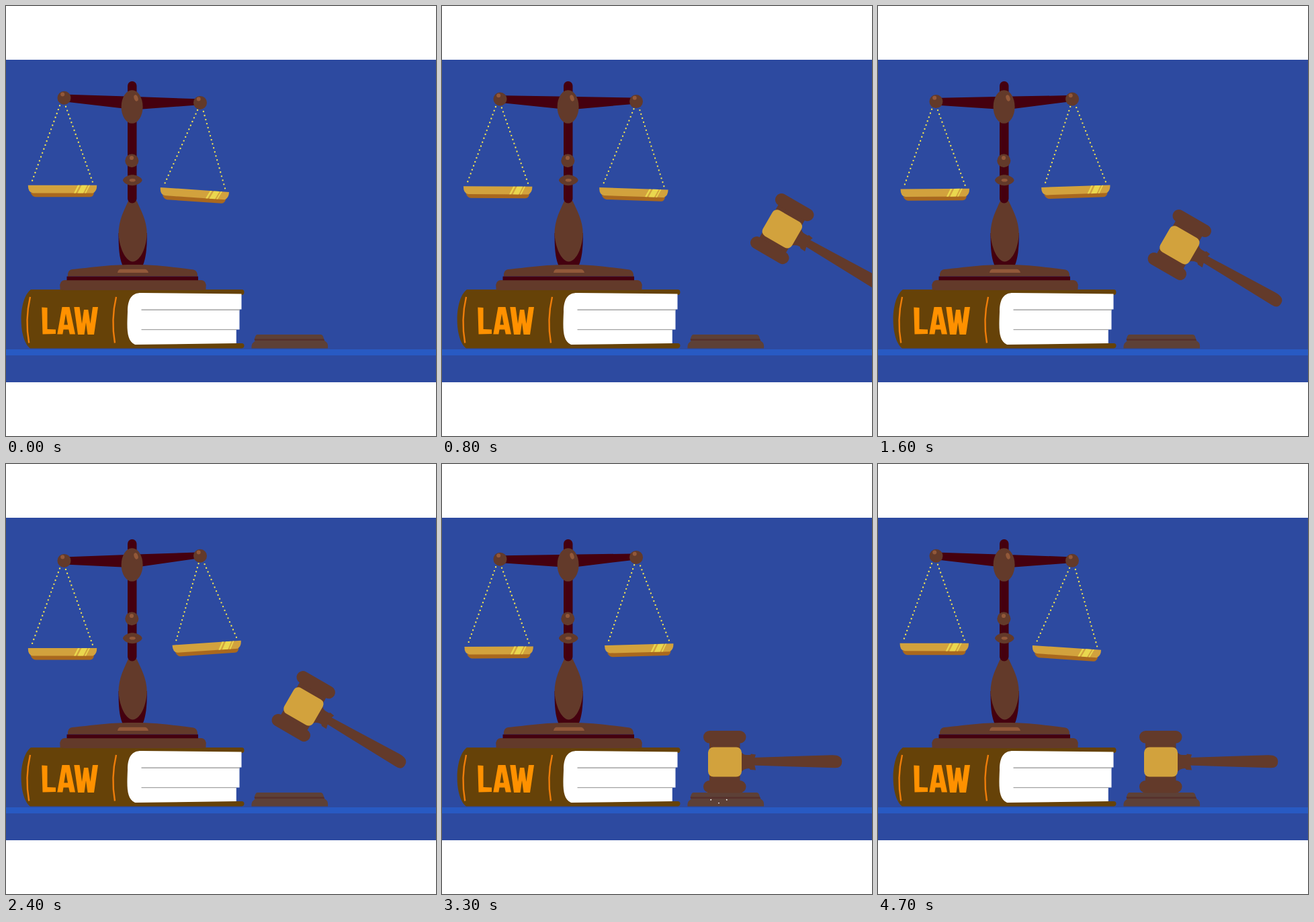
An HTML page that plays this animation: 640x640 px, repeating every 4800 ms.

```html
<!DOCTYPE html>
<html lang="en">
<head>
<meta charset="utf-8">
<title>Scales and gavel</title>
<style>
  html, body { margin: 0; width: 100%; height: 100%; overflow: hidden; background: #fff; }
  svg { display: block; width: 100%; height: 100%; }
  .wood { fill: #633a2a; }
  .dark { fill: #45000f; }
  .shine { fill: #925839; }
  .gold { fill: #d2a23d; }
  .string { stroke: #efe052; stroke-width: 2.4; stroke-linecap: round; stroke-dasharray: 0 6.25; }
</style>
</head>
<body>
<svg viewBox="0 0 640 640">
  <defs>
    <g id="pan">
      <path class="string" d="M-4 -118.5L-45.8 -4.5M5 -117L45 -4.5"/>
      <path fill="#a9681e" d="M-47.5 11H47Q46 17.5 41 17.5H-40Q-45 17 -47.5 11Z"/>
      <path class="gold" d="M-51.2 0H51.2Q51.5 8.5 45.5 11.7H-44Q-51.5 10.5 -51.2 0Z"/>
      <path fill="#ead74e" d="M23 0h2.8l-6 11.7h-2.8zM28.5 0h8.5l-6 11.7h-8.5zM39 0h2l-6 11.7h-2z"/>
    </g>
    <g id="knob">
      <circle class="wood" r="10"/>
      <circle class="shine" cx="-2.3" cy="-5.3" r="3"/>
    </g>
  </defs>

  <path fill="#2d4aa0" d="M0 80H640V560H0Z"/>
  <path fill="#285ac3" d="M0 511H640V520H0Z"/>

  <g id="block">
    <path fill="#5d4037" d="M374 489H468Q471 489 472 492L474 498L477.5 501Q479.5 503 479 509.5H365.5Q365 503 368 501L371 498Q369 496 371 492Q372 489 374 489Z"/>
    <path fill="#56302b" d="M369.5 495.6H473L474 498H370Z"/>
  </g>

  <g id="book">
    <path fill="#664208" d="M37 422H351Q354.5 422 354.5 426T351 430H340V502H351Q354.5 502 354.5 505.5T351 509.5H36C18 496 18 436 37 422Z"/>
    <path fill="#fff" d="M201 427L350.5 428.5V451.5H347.5V481.5H342.8V502L192 504C179 498 180 480 181 455C181 435 188 427 201 427Z"/>
    <path fill="none" stroke="#a3a3a3" stroke-width="1.4" d="M201.5 452.2H348M201.5 481.6H343"/>
    <path fill="none" stroke="#ee7d0a" stroke-width="2.4" d="M36 433Q28 467 34.2 501.5M164 433Q156 467 162 501.5"/>
    <path role="img" aria-label="LAW" fill="#ff9100" fill-rule="evenodd"
      d="M53.3 448.5L61.5 449V481L74 481.5V488L54.5 488.5Z
         M76.3 488.5L83.5 448H94.5L103 488.5H94.8L93.3 481.5H85.5L84.3 488.5ZM86.3 474.5H92L89 458Z
         M101.3 448H109.5L113 473L116 452H122.3L125.5 473L129 448H137L131 489H121.5L119 471L116.5 489H107Z"/>
  </g>

  <g id="stand">
    <rect class="wood" x="80.5" y="408" width="217" height="15" rx="7"/>
    <path class="wood" d="M80.5 414H297.5V422.5H80.5Z"/>
    <path class="dark" d="M167.5 338C167.5 364 169 375 173.5 386.5H203.5C208 376 210 362 209.8 338Z"/>
    <path class="wood" d="M92 402.5Q91.5 393 98 392C130 389 150 385 188 385S250 389 279 392.5Q285.5 394 285 402.5Z"/>
    <path class="dark" d="M90.5 402.5H286V408.3H90.5Z"/>
    <path class="shine" d="M170 391.8H207Q210.5 392 212 397H166Q167 392 170 391.8Z"/>
    <path class="wood" d="M182 290C176 304 167.5 318 167.5 340C169.5 365 180 380 188.5 380.5C198 380 208 365 209.8 340C209.8 318 200 303 194.5 290Z"/>
    <rect class="dark" x="181" y="112" width="13.5" height="181.5" rx="6.7"/>
    <circle class="wood" cx="187.3" cy="230.2" r="10"/>
    <circle class="shine" cx="187" cy="226" r="3.1"/>
    <path class="wood" d="M188 251.3C195 251.3 202.5 256 202.5 259.3S195 267.3 188 267.3S174 262.5 174 259.3S181 251.3 188 251.3Z"/>
    <ellipse class="shine" cx="188.2" cy="259.3" rx="4.5" ry="2.3"/>
  </g>

  <path id="beam" class="dark" d="M93 135L187 134.8L284 134.8V144.2L203 152.9H173L93 146.3Z"/>
  <use id="leftPan" href="#pan"/>
  <use id="rightPan" href="#pan"/>
  <use id="leftKnob" href="#knob"/>
  <use id="rightKnob" href="#knob"/>
  <ellipse class="wood" cx="187.6" cy="150" rx="16" ry="24.8"/>
  <ellipse class="shine" cx="193.5" cy="137" rx="2.9" ry="4.8" transform="rotate(-20 193.5 137)"/>

  <path id="spark" fill="none" stroke="#fff" stroke-width="1.6" stroke-linecap="round"/>

  <g id="gavel" class="wood">
    <path d="M462 437L580 433.3Q595.3 433 595.3 443T584 452.2L462 448.5Z"/>
    <path d="M445 428Q448 433 453 433H459L460 431.5L467 432.5L465.5 437V449L467 455.5L459 455L457 453Q449 453 445 459Z"/>
    <path d="M398 410H443.5V476H398Z"/>
    <rect x="389" y="397" width="63.5" height="18.7" rx="9.3"/>
    <rect x="389" y="471" width="63.5" height="18.5" rx="9.2"/>
    <rect class="gold" x="396" y="421.5" width="50" height="44" rx="8"/>
  </g>
</svg>
<script>
const LOOP = 4800, STEP = 100;
const PIVOT = { x: 187.75, y: 140.3, arm: 101.3 };
const GRIP = { x: 586, y: 443 };
const part = id => document.getElementById(id);
const pose = (id, transform) => part(id).setAttribute('transform', transform);
const clamp = v => Math.min(1, Math.max(0, v));
const DEG = Math.PI / 180;

function drawScales(t) {
  const swing = Math.cos(2 * Math.PI * t / LOOP);
  const tilt = 2.03 * swing;
  const dx = PIVOT.arm * Math.cos(tilt * DEG), dy = PIVOT.arm * Math.sin(tilt * DEG);
  const left = `translate(${PIVOT.x - dx} ${PIVOT.y - dy})`;
  const right = `translate(${PIVOT.x + dx} ${PIVOT.y + dy})`;
  const leftLag = 0.85 * swing * Math.sqrt(1 - swing * swing);
  pose('beam', `rotate(${tilt} ${PIVOT.x} ${PIVOT.y})`);
  pose('leftKnob', left);
  pose('rightKnob', right);
  pose('leftPan', `${left} rotate(${leftLag}) translate(-2.5 130)`);
  pose('rightPan', `${right} rotate(${3.9 * swing}) translate(0.8 129.8)`);
}

// Glides in from the right, then swings down about the end of its handle.
function drawGavel(t) {
  const left = 1 - clamp(t / 2400);
  const fall = Math.sin(Math.PI / 2 * clamp((t - 2400) / 640) ** 0.8) ** 2;
  const x = 252 * left ** 3.4, y = -80 * left ** 2.5;
  pose('gavel', `translate(${x} ${y}) rotate(${30 * (1 - fall)} ${GRIP.x} ${GRIP.y})`);
}

function drawSpark(t) {
  const p = (t - 2720) / 640;
  let d = '';
  if (p > 0 && p < 1) {
    const tip = 20 * (1 - (1 - p) ** 2) - 3, tail = 20 * p * p;
    for (let i = 0; i < 8 && tip > tail; i++) {
      const c = Math.cos(i * Math.PI / 4), s = Math.sin(i * Math.PI / 4);
      d += `M${412 + tail * c} ${488 + tail * s}L${412 + tip * c} ${488 + tip * s}`;
    }
  }
  part('spark').setAttribute('d', d);
}

function draw(ms) {
  const t = Math.floor(ms % LOOP / STEP) * STEP;
  drawScales(t);
  drawGavel(t);
  drawSpark(t);
}

const start = performance.now();
function tick() {
  draw(performance.now() - start);
  requestAnimationFrame(tick);
}
tick();
</script>
</body>
</html>
```
